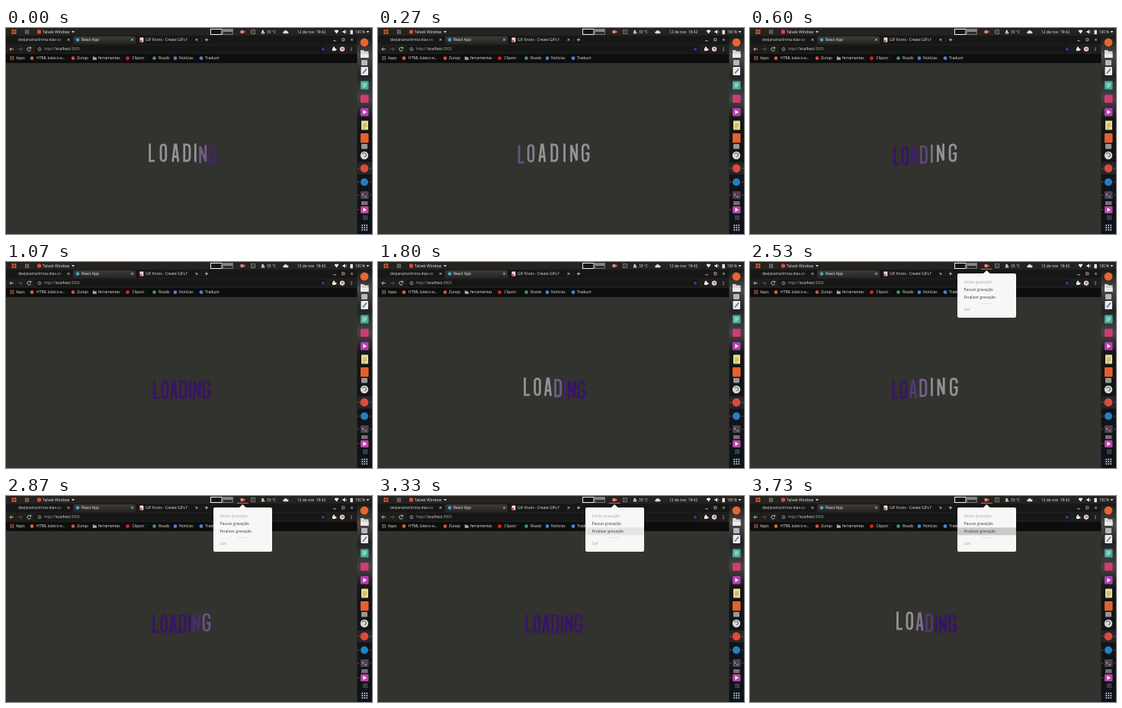
An HTML page that plays this animation: 480x270 px, repeating every 3790 ms.

```html
<!DOCTYPE html>
<html lang="pt">
<head>
<meta charset="utf-8">
<title>Loading</title>
<style>
  html, body { margin: 0; width: 100%; height: 100%; overflow: hidden; background: #32322e; }
  svg { display: block; width: 480px; height: 270px; }
  text { font-family: "Open Sans", "Noto Sans", sans-serif; white-space: pre; }
</style>
</head>
<body>
<svg id="stage" viewBox="0 0 480 270" xmlns="http://www.w3.org/2000/svg">
  <defs>
    <pattern id="hatch" width="3" height="2.2" patternUnits="userSpaceOnUse" patternTransform="rotate(-58)">
      <rect width="3" height="2.2" fill="#fff"/>
      <rect width="3" height=".7" fill="#aaa"/>
    </pattern>
    <mask id="sketch" maskUnits="userSpaceOnUse" x="170" y="145" width="125" height="42">
      <rect x="170" y="145" width="125" height="42" fill="url(#hatch)"/>
    </mask>
    <linearGradient id="fade">
      <stop offset="0" stop-color="#171717" stop-opacity="0"/>
      <stop offset="1" stop-color="#171717"/>
    </linearGradient>
    <linearGradient id="tab" x2="0" y2="1">
      <stop offset="0" stop-color="#3d3c3a"/>
      <stop offset="1" stop-color="#242423"/>
    </linearGradient>
    <linearGradient id="dock" x2="0" y2="1">
      <stop offset="0" stop-color="#1a1919"/>
      <stop offset=".1" stop-color="#4a4847"/>
      <stop offset=".2" stop-color="#242323"/>
      <stop offset=".32" stop-color="#454443"/>
      <stop offset=".42" stop-color="#151516"/>
      <stop offset="1" stop-color="#0d131b"/>
    </linearGradient>
  </defs>
</svg>
<script>
const stage = document.getElementById('stage');

function add(tag, attrs, parent = stage) {
  const node = document.createElementNS('http://www.w3.org/2000/svg', tag);
  for (const key in attrs) node.setAttribute(key, attrs[key]);
  return parent.appendChild(node);
}
const box = (x, y, width, height, fill, rx = 0, parent) =>
  add('rect', { x, y, width, height, fill, rx }, parent);
const dot = (cx, cy, r, fill) => add('circle', { cx, cy, r, fill });
const shape = (d, fill, parent) => add('path', { d, fill }, parent);
const line = (d, stroke, width = 0.8) =>
  add('path', { d, stroke, fill: 'none', 'stroke-width': width });
const label = (x, y, str, fill = '#e4e4e2', size = 5, parent) =>
  add('text', { x, y, fill, 'font-size': size }, parent).textContent = str;
const cross = (x, y, r = 1.4) =>
  line(`M${x - r} ${y - r}l${2 * r} ${2 * r}m0 ${-2 * r}l${-2 * r} ${2 * r}`, '#e0e0e0');
function grid(x, y, step, size, fill) {
  for (let i = 0; i < 9; i++)
    box(x + (i % 3) * step, y + Math.floor(i / 3) * step, size, size, fill);
}

function drawPanel() {
  box(0, 0, 480, 10, '#25221f');
  box(7.5, 2, 6, 6, '#d8552f', 0.6);
  line('M10.5 2v6M7.5 5h6', '#25221f', 0.7);
  grid(25, 2.6, 1.9, 1.2, '#b5b3b0');
  dot(43.5, 5, 2.7, '#dc4a3d');
  label(48, 6.9, 'Talvek Window', '#eeeeec', 5.1);
  shape('M86 4h4l-2 2.4z', '#ddd');

  add('rect', { x: 268.5, y: 1.5, width: 14.5, height: 7, fill: '#161616', stroke: '#eee', 'stroke-width': 1 });
  add('rect', { x: 284.5, y: 1.5, width: 13, height: 7, fill: '#2c2c2c', stroke: '#888', 'stroke-width': 0.8 });
  box(285, 2, 12, 3, '#858585');

  box(307.5, 3, 4.2, 4, '#e2877e', 0.7);
  shape('M311.7 5l1.8-1.6v3.4z', '#e2877e');
  line('M321.5 2.5h5v5h-5zM323 4l1.3 1-1.3 1', '#bbb', 0.6);
  dot(336.7, 4, 1.3, '#ddd');
  shape('M335 7.4a1.5 1.5 0 0 1 1.1-2.4 1.8 1.8 0 0 1 3 1 1 1 0 0 1 0 1.4z', '#bbb');
  label(342, 6.9, '33 °C', '#eeeeec', 4.9);
  shape('M364 7.2a1.5 1.5 0 0 1 .7-2.8 2.2 2.2 0 0 1 4 0 1.4 1.4 0 0 1 .7 2.8z', '#ddd');
  label(382, 6.9, '12 de nov  19:42', '#f2f2f0', 4.9);
  shape('M430.5 3.6q3-2.2 6 0l-3 4z', '#eee');
  shape('M441.5 4h1.4l2-1.8v5.6l-2-1.8h-1.4z', '#eee');
  line('M446 3.4q1.2 1.6 0 3.2', '#eee', 0.6);
  box(451.5, 2.8, 3.4, 5.4, '#eee', 0.4);
  label(458, 6.9, '100 %', '#f2f2f0', 4.6);
  shape('M472.5 4h4l-2 2.4z', '#ddd');
}

function drawBrowser() {
  // tabs
  box(0, 10, 461, 11, '#171717');
  label(16, 17.2, 'devJanaina/trinta-dias-co', '#dcdcda', 4.9);
  box(68, 11, 10, 9, 'url(#fade)');
  cross(82, 15.4);
  shape('M87 21q1 0 1-2v-6q0-2 2-2h78q2 0 2 2V19q0 2 1 2z', 'url(#tab)');
  dot(94, 15.5, 2.2, '#4aa9c4');
  label(99, 17.2, 'React App', '#f2f2f0', 4.9);
  cross(165.5, 15.4);
  box(175.5, 12.6, 4.8, 5.8, '#e9e4e2', 0.6);
  box(175.5, 15.6, 3, 2.8, '#d64a48');
  label(183, 17.2, 'GIF Knots - Create GIFs f', '#e6e6e4', 4.9);
  box(237, 11, 9, 9, 'url(#fade)');
  box(246, 11, 3, 9, '#171717');
  cross(250, 15.4);
  line('M256.5 12.5v6', '#444', 0.5);
  line('M260.8 15.4h4.4M263 13.2v4.4', '#ddd');
  line('M429.2 16.8h3.6', '#ddd');
  line('M440.8 13.8h3v3h-3z', '#ddd', 0.7);
  cross(453.5, 15.4);

  // address bar
  box(0, 21, 461, 13, '#1e1e1d');
  box(37, 22.5, 384, 10, '#161616', 5);
  line('M10 27.7H5M7.2 25.5L5 27.7l2.2 2.2', '#ddd');
  line('M16 27.7h5M18.8 25.5l2.2 2.2-2.2 2.2', '#666');
  line('M32.3 26.4a2.4 2.4 0 1 0 .2 2.2M32.6 24.8v1.9h-1.9', '#e4e4e4');
  add('circle', { cx: 44, cy: 27.7, r: 2.1, fill: 'none', stroke: '#ccc', 'stroke-width': 0.6 });
  line('M44 27.2v1.7M44 26.2v.5', '#ccc', 0.6);
  label(50, 29.4, 'http://', '#acacaa', 4.7);
  label(64.6, 29.4, 'localhost', '#f2f2f0', 4.7);
  label(84.6, 29.4, ':3000', '#acacaa', 4.7);
  dot(416, 27.8, 2.1, '#2e3b8c');
  box(428, 26.2, 4.2, 3.8, '#eee', 0.5);
  dot(430, 25.7, 1.1, '#eee');
  dot(432.6, 28.2, 1, '#eee');
  dot(441, 27.6, 3.2, '#e9d5cf');
  dot(441.3, 27.2, 1.5, '#b5776d');
  for (let i = -1; i < 2; i++) dot(453, 27.6 + i * 1.8, 0.55, '#ddd');

  // bookmarks
  box(0, 34, 461, 12, '#0d0d0d');
  grid(5.2, 36.9, 1.9, 1.2, '#d9824b');
  dot(34, 39.6, 2.3, '#dd6433');
  dot(88, 39.6, 2.3, '#d94c40');
  shape('M113.8 37.6h2l.7.8h2.3v3.4h-5z', '#a9a9a7');
  dot(159.5, 39.6, 2.4, '#e3231c');
  dot(194.5, 39.6, 2.3, '#3f9c59');
  dot(222, 39.6, 2.3, '#4c86d8');
  dot(256, 39.6, 2.4, '#4c83dc');
  [[13, 'Apps'], [40, 'HTML básico e…'], [93, 'Zunqo'], [121, 'ferramentas'], [165.5, 'Clipzor'],
   [200, 'Roads'], [227, 'Notícias'], [261, 'Traduzir']]
    .forEach(([x, str]) => label(x, 41.4, str, '#ececea', 5));

  box(0, 46, 461, 224, '#32322e');
}

function drawDock() {
  box(460.5, 10, 19.5, 260, 'url(#dock)');
  dot(470, 19, 5.4, '#e8652d');
  shape('M465 29h4l1 1.5h5.5V39H465z', '#d9d4d0');
  box(465, 34, 10.5, 5, '#eceae7', 0.6);
  box(466, 42, 8, 7, '#b8b8b8', 0.8);
  box(465.5, 51, 9.5, 11, '#ecebe8', 1);
  line('M468 59.5l5-6', '#416fc0', 1.5);
  box(465, 69.5, 10.5, 11, '#42ae9c', 1.2);
  line('M467.5 73h5.5M467.5 75h5.5M467.5 77h4', '#e4f5f0', 0.9);
  box(465, 87.5, 10.5, 10.5, '#cf3c72', 1);
  box(465, 105, 10.5, 10.5, '#b83db5', 1.5);
  shape('M468.5 107.5l4.5 2.8-4.5 2.8z', '#fff');
  box(466, 121.5, 9, 12, '#e8dc8e', 0.8);
  line('M468 126h5M468 128.5h5M468 131h3', '#94803f', 0.8);
  box(465, 138, 10.5, 12.5, '#e4602f', 1);
  box(466, 152, 8, 6.5, '#9b9794', 1);
  dot(470, 167, 5.2, '#d8d6d2');
  line('M467 165q3-3 5 0t-2 4', '#4c4c4a', 1);
  box(461, 176, 19, 16, '#25262a', 1.5);
  dot(470, 184, 5.4, '#dc4a3d');
  dot(470, 202, 5, '#237fc4');
  box(465, 214, 10.5, 10, '#51404f', 1);
  line('M467 217l2 1.5-2 1.5M470 221h3', '#ddd', 0.7);
  box(466, 227, 8.5, 5, '#77706f', 0.6);
  box(465, 233.5, 10.5, 9.5, '#b944a5', 1.5);
  shape('M468.5 235.5l4.5 2.7-4.5 2.7z', '#fff');
  grid(468.5, 246, 2.1, 1.1, '#aaa');
  grid(466.5, 257.8, 3, 1.6, '#f0f0ee');
  [34, 184, 202, 219, 238].forEach(y => dot(462.3, y, 0.8, '#e05a30'));
  [184, 202, 219].forEach(y => dot(478, y, 0.6, '#bbb'));
}

function drawMenu() {
  const menu = add('g', { opacity: 0 });
  box(303, 8.8, 14.5, 1.2, '#e0592f', 0, menu);
  shape('M305.5 15.5l4.8-4.5 4.8 4.5z', '#f7f7f5', menu);
  box(272, 15, 77, 58, '#f7f7f5', 2, menu);
  const hover = box(272, 41.3, 77, 10, '#e4e4e2', 0, menu);
  [[28, 'Iniciar gravação', '#a5a5a3'], [38, 'Pausar gravação', '#383836'],
   [48, 'Finalizar gravação', '#383836'], [64.3, 'Sair', '#a5a5a3']]
    .forEach(([y, str, fill]) => label(280.5, y, str, fill, 5, menu));
  box(303, 54, 14, 0.6, '#ddd5cf', 0, menu);
  return { menu, hover };
}

// each glyph: width, centre line inside a 24px tall cell
const GLYPHS = [
  [8, 'M1.4 0V22.6H8'],
  [9.5, 'M1.4 6Q1.4 1.4 4.75 1.4T8.1 6V18Q8.1 22.6 4.75 22.6T1.4 18Z'],
  [10, 'M1.4 24L4.2 1.4H5.8L8.6 24M2.5 17H7.5'],
  [10, 'M1.4 1.4H4.5Q8.6 1.4 8.6 6V18Q8.6 22.6 4.5 22.6H1.4Z'],
  [3.5, 'M1.75 0V24'],
  [10, 'M1.4 24V2L8.6 22V0'],
  [10.5, 'M9.1 7.5V6Q9.1 1.4 5.25 1.4T1.4 6V18Q1.4 22.6 5.25 22.6T9.1 18V13H5.5']
];
const GAP = 2.2, SPREAD = 4.7, CENTER = 230.7, BASE = 155.5, LIFT = 4;
const PURPLE = [58, 14, 114], GREY = [158, 157, 161];
const LOOP = 3790, FPS = 15, WAVE = 2000;

drawPanel();
drawBrowser();
drawDock();
const word = add('g', { mask: 'url(#sketch)', fill: 'none', 'stroke-width': 2.8 });
const letters = GLYPHS.map(([, d]) => add('path', { d }, word));
const { menu, hover } = drawMenu();

const clamp = v => Math.min(1, Math.max(0, v));
const ramp = (t, start, length) => clamp((t - start) / length);

// each letter runs the same wave, 100 ms after the one before
const phase = (t, i) => (t - i * 100 - 1370 + 2 * WAVE) % WAVE;
// 0 = low and purple, 1 = raised and grey
const glow = u => ramp(u, 0, 220) - ramp(u, 740, 320);
// side room opens steadily, then closes again
const room = u => SPREAD * clamp(1 - Math.abs(u - 560) / 480);

function render(t) {
  const phases = GLYPHS.map((_, i) => phase(t, i));
  const width = GLYPHS.reduce((sum, [w], i) => sum + w + GAP + room(phases[i]), -GAP);
  let x = CENTER - width / 2;
  letters.forEach((letter, i) => {
    const g = glow(phases[i]), side = room(phases[i]);
    const rgb = PURPLE.map((c, k) => Math.round(c + (GREY[k] - c) * g));
    letter.setAttribute('transform', `translate(${x + side / 2} ${BASE - LIFT * g})`);
    letter.setAttribute('stroke', `rgb(${rgb})`);
    x += GLYPHS[i][0] + GAP + side;
  });
  menu.setAttribute('opacity', ramp(t, 2060, 140));
  hover.setAttribute('opacity', t < 3260 ? 0 : 1);
  hover.setAttribute('fill', t < 3590 ? '#e4e4e2' : '#c9c9c7');
}

const start = performance.now();
function tick() {
  const t = (performance.now() - start) % LOOP;
  render(Math.floor(t * FPS / 1000 + 0.051) * 1000 / FPS);
  requestAnimationFrame(tick);
}
tick();
</script>
</body>
</html>
```
